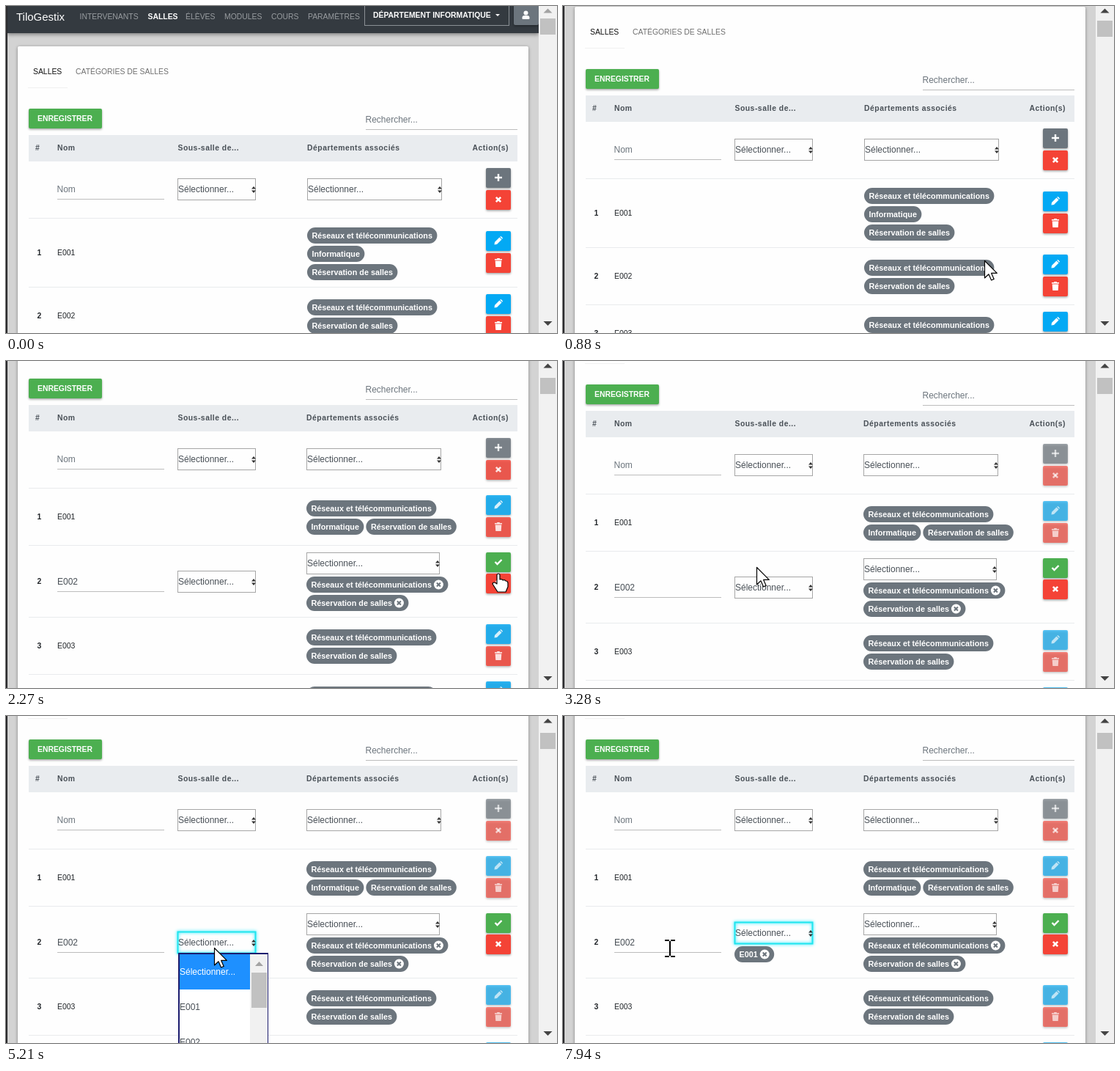
Animation of 752x446 px, one loop 8000 ms. Source, as an HTML page with a canvas:

```html
<!DOCTYPE html>
<html lang="fr">
<head>
<meta charset="utf-8">
<style>
  html, body { margin: 0; width: 100%; height: 100%; overflow: hidden; background: #d3d3d3; }
  canvas { display: block; }
</style>
</head>
<body>
<canvas id="stage" width="752" height="446"></canvas>
<script>
const ctx = document.getElementById('stage').getContext('2d');
const LOOP = 8000;
const FONT = '"Liberation Sans", Arial, sans-serif';
const GRAY = '#6c757d', GREEN = '#4caf50', RED = '#f44336', BLUE = '#03a9f4';
const NET = 'Réseaux et télécommunications', INFO = 'Informatique', BOOKING = 'Réservation de salles';
const rooms = [
  ['E001', [NET, INFO, BOOKING]],
  ['E002', [NET, BOOKING]],
  ['E003', [NET, BOOKING]],
  ['E004', [NET, INFO, BOOKING]],
];

// [time, value]: values hold until the next time
const scrollSteps = [[0, 0], [770, 14], [880, 54], [950, 88], [1020, 110], [1090, 116],
  [2570, 113], [2650, 110], [2730, 108]];
const fadeSteps = [[0, 1], [2270, .82], [2400, .65]];

// [first step, last step, step count, x, y]
const pointerMoves = [
  [300, 300, 1, 586, 377], [380, 380, 1, 575, 347], [1320, 1870, 8, 672, 290],
  [3110, 3280, 3, 264, 281], [3360, 3510, 3, 244, 311], [3590, 3740, 3, 267, 294],
  [4350, 4430, 2, 285, 303], [4590, 4590, 1, 285, 312], [5210, 5210, 1, 284, 316],
  [5290, 5680, 6, 264, 379], [6380, 6760, 6, 541, 266], [6930, 7010, 2, 550, 266],
  [7310, 7550, 4, 247, 291], [7860, 7940, 2, 146, 317],
];

const held = (steps, t) => steps.filter(s => s[0] <= t).pop()[1];

function pointerAt(t) {
  let x = 586, y = 377;
  for (const [from, to, count, toX, toY] of pointerMoves) {
    if (t < from) break;
    const gap = (to - from) / Math.max(1, count - 1);
    const done = gap ? Math.min(count, Math.floor((t - from) / gap + .01) + 1) / count : 1;
    x += (toX - x) * done;
    y += (toY - y) * done;
  }
  return { x: Math.round(x), y: Math.round(y) };
}

function rect(x, y, w, h, color) {
  ctx.fillStyle = color;
  ctx.fillRect(x, y, w, h);
}

function pill(x, y, w, h, r, color) {
  ctx.fillStyle = color;
  ctx.beginPath();
  ctx.roundRect(x, y, w, h, r);
  ctx.fill();
}

function shadow(color, blur, dy) {
  ctx.shadowColor = color;
  ctx.shadowBlur = blur;
  ctx.shadowOffsetY = dy;
}

function raised(x, y, w, h, color) {
  ctx.save();
  shadow('rgba(0,0,0,.35)', 3, 1.5);
  pill(x, y, w, h, 2, color);
  ctx.restore();
}

function text(str, x, y, size, color, weight = '', spacing = 0) {
  ctx.font = `${weight} ${size}px ${FONT}`;
  ctx.letterSpacing = spacing + 'px';
  ctx.fillStyle = color;
  ctx.fillText(str, x, y);
}

function shape(points, color) {
  ctx.fillStyle = color;
  ctx.beginPath();
  points.forEach(([x, y]) => ctx.lineTo(x, y));
  ctx.closePath();
  ctx.fill();
}

function line(points, width, color) {
  ctx.strokeStyle = color;
  ctx.lineWidth = width;
  ctx.beginPath();
  points.forEach(([x, y], i) => i ? ctx.lineTo(x, y) : ctx.moveTo(x, y));
  ctx.stroke();
}

function cross(r, width, color) {
  line([[-r, -r], [r, r]], width, color);
  line([[-r, r], [r, -r]], width, color);
}

function disc(x, y, r, color) {
  ctx.fillStyle = color;
  ctx.beginPath();
  ctx.arc(x, y, r, 0, 7);
  ctx.fill();
}

function at(x, y, draw) {
  ctx.save();
  ctx.translate(x, y);
  draw();
  ctx.restore();
}

const icons = {
  plus() {
    rect(-5, -1.2, 10, 2.4, '#fff');
    rect(-1.2, -5, 2.4, 10, '#fff');
  },
  cross() { cross(3.2, 2.6, '#fff'); },
  check() { line([[-4.5, 0], [-1.5, 3], [4.5, -3]], 2.4, '#fff'); },
  pencil() {
    shape([[-5.5, 5.5], [-5, 2], [1.5, -4.5], [4.5, -1.5], [-2, 5]], '#fff');
    shape([[2.2, -5.2], [3.6, -6], [6, -3.6], [5.2, -2.2]], '#fff');
  },
  trash() {
    rect(-5, -5, 10, 1.6, '#fff');
    rect(-1.8, -6, 3.6, 1.5, '#fff');
    shape([[-4.3, -2.6], [4.3, -2.6], [3.7, 6], [-3.7, 6]], '#fff');
  },
};

function iconButton(y, color, icon, alpha = 1) {
  ctx.globalAlpha = alpha;
  raised(655, y, 34, 27, color);
  at(672, y + 13, icons[icon]);
  ctx.globalAlpha = 1;
}

function badge(label, x, y, closable) {
  ctx.font = `bold 10.8px ${FONT}`;
  ctx.letterSpacing = '0px';
  const w = ctx.measureText(label).width + (closable ? 29 : 13);
  pill(x, y, w, 22, 11, GRAY);
  text(label, x + 6.5, y + 15, 10.8, '#fff', 'bold');
  if (closable) at(x + w - 13, y + 11, () => {
    disc(0, 0, 6.5, '#fff');
    cross(2.5, 2, GRAY);
  });
  return w;
}

function select(x, y, w, focused) {
  ctx.save();
  if (focused) shadow('#00e5ff', 4, 0);
  ctx.lineWidth = focused ? 2 : 1;
  ctx.strokeStyle = focused ? '#1fe5ee' : '#a6a6a6';
  ctx.strokeRect(x + .5, y + .5, w - 1, 29);
  ctx.restore();
  text('Sélectionner...', x + 1, y + 19, 12, '#495057');
  at(x + w - 3, y + 15.5, () => {
    shape([[-3, -1], [0, -4.5], [3, -1]], '#333');
    shape([[-3, 1], [0, 4.5], [3, 1]], '#333');
  });
}

function navbar() {
  ctx.save();
  shadow('rgba(0,0,0,.4)', 5, 2);
  rect(2, 0, 725, 37, '#343a40');
  ctx.restore();
  text('TiloGestix', 14, 20, 15, '#fff');
  const items = [['INTERVENANTS', 100.5], ['ÉLÈVES', 245], ['MODULES', 298], ['COURS', 362], ['PARAMÈTRES', 412]];
  items.forEach(([label, x]) => text(label, x, 18, 10.4, '#999da0'));
  text('SALLES', 193.5, 18, 10.4, '#fff', 'bold');
  ctx.lineWidth = 1;
  ctx.strokeStyle = '#8b9095';
  ctx.strokeRect(489.5, -2.5, 197, 29);
  text('DÉPARTEMENT INFORMATIQUE', 501, 16, 10.4, '#fff', 'bold');
  shape([[668, 11], [674, 11], [671, 14]], '#fff');
  raised(693, -2, 34, 28, GRAY);
  disc(709.5, 9.5, 3, '#fff');
  pill(704.5, 13, 10, 5, [3, 3, 1, 1], '#fff');
}

function toolbarAndHead(deptX) {
  text('SALLES', 37, 93, 10.4, '#111');
  text('CATÉGORIES DE SALLES', 95, 93, 10.4, '#707070');
  rect(30, 111, 54, 1, '#f0f0f0');
  raised(31, 140, 100, 27, GREEN);
  text('ENREGISTRER', 43, 157, 10.4, '#fff', 'bold');
  text('Rechercher...', 490.5, 159, 12, GRAY);
  rect(491, 168, 207, 1, '#bdbdbd');
  rect(31, 176, 667, 36, '#e9ecef');
  const heads = [['#', 40], ['Nom', 70], ['Sous-salle de...', 234.5], ['Départements associés', deptX], ['Action(s)', 636.5]];
  heads.forEach(([label, x]) => text(label, x, 197, 10.4, '#495057', 'bold', .5));
}

function filterRow(deptX, fade) {
  text('Nom', 69.5, 254, 12, GRAY);
  rect(70, 263, 146, 1, '#bdbdbd');
  select(234, 235, 107);
  select(deptX, 235, 184);
  iconButton(221, GRAY, 'plus', fade);
  iconButton(251, RED, 'cross', fade);
}

function editedRow(name, badges, mid, state) {
  text(name, 70, mid + 4, 12, '#495057');
  rect(70, mid + 13, 146, 1, '#bdbdbd');
  select(234, mid - (state.chosen ? 28 : 15), 107, state.focused);
  if (state.chosen) badge('E001', 234, mid + 5, true);
  select(410, mid - 40, 182);
  badges.forEach((label, i) => badge(label, 410, mid - 7 + 25 * i, true));
  iconButton(mid - 40, GREEN, 'check');
  iconButton(mid - 11, RED, 'cross');
}

function roomRows(deptX, state) {
  let top = 290;
  rooms.forEach(([name, badges], i) => {
    const edited = state.editing && i === 1;
    // the wider column lets the two short badges share a line
    const lines = state.editing && badges.length === 3
      ? [[badges[0]], badges.slice(1)] : badges.map(label => [label]);
    const tall = lines.length === 3;
    const height = edited ? 98 : tall ? 94 : 78;
    const mid = top + height / 2;
    rect(31, top - 1, 667, 1, '#e9ebed');
    text(i + 1, 42.5, mid + 3, 10.4, '#212529', 'bold');
    if (edited) editedRow(name, badges, mid, state);
    else {
      text(name, 70, mid + 3, 10.4, '#212529');
      lines.forEach((labels, row) => {
        let x = deptX;
        for (const label of labels) x += badge(label, x, top + (tall ? 12 : 16) + 25 * row) + 3;
      });
      iconButton(mid - 30, BLUE, 'pencil', state.fade);
      iconButton(mid, RED, 'trash', state.fade);
    }
    top += height;
  });
}

function scrollbar(scroll) {
  rect(727, 0, 25, 446, '#f1f1f1');
  rect(729, Math.round(17 + scroll * .054), 21, 22, '#c1c1c1');
  shape([[733.5, 9.5], [739.5, 3.5], [745.5, 9.5]], scroll ? '#444' : '#a3a3a3');
  shape([[733.5, 430], [739.5, 436], [745.5, 430]], '#444');
}

function dropdown(hovered) {
  rect(235, 323, 123, 123, '#1c1c6e');
  rect(237, 325, 96, 121, '#fff');
  rect(333, 325, 24, 121, '#f1f1f1');
  rect(335, 350, 21, 48, '#c1c1c1');
  shape([[340, 341], [345.5, 335], [351, 341]], '#a3a3a3');
  ['Sélectionner...', 'E001', 'E002'].forEach((label, i) => {
    if (i === hovered) rect(237, 325 + 48 * i, 96, 48, '#1e90ff');
    text(label, 237, 353 + 48 * i, 12, i === hovered ? '#fff' : '#495057');
  });
}

function outlined(path) {
  ctx.fillStyle = '#fff';
  ctx.strokeStyle = '#000';
  ctx.lineWidth = 1.2;
  ctx.lineJoin = 'round';
  ctx.fill(path);
  ctx.stroke(path);
}

const arrow = new Path2D('M.5 .5V24L6 18.8L9.6 27L13.2 25.4L9.7 17.4H17.3Z');
const hand = new Path2D('M-2 1.5Q0-1.5 2 1.5V8Q5 7 6 9Q9 8 10 10Q13 10 13 13V18L10 25H-1L-8 14Q-7 10-2 14Z');

function pointer({ x, y }) {
  at(x, y, () => {
    if (x > 655) outlined(hand);
    else if (x > 216) outlined(arrow);
    else {
      rect(-1, -10, 2, 20, '#000');
      for (const edge of [-12, 10]) {
        rect(-7, edge, 6, 2, '#000');
        rect(1, edge, 6, 2, '#000');
      }
    }
  });
}

function draw(t) {
  const scroll = held(scrollSteps, t);
  const state = {
    editing: t >= 2270,
    fade: held(fadeSteps, t),
    focused: t >= 4590,
    chosen: t >= 6000,
  };
  const deptX = state.editing ? 410 : 411;
  const mouse = pointerAt(t);

  rect(0, 0, 752, 446, '#d3d3d3');
  at(0, -scroll, () => {
    navbar();
    ctx.save();
    shadow('rgba(0,0,0,.4)', 4, 1);
    pill(16, 55, 697, 900, 2, '#fefefe');
    ctx.restore();
    toolbarAndHead(deptX);
    filterRow(deptX, state.fade);
    roomRows(deptX, state);
  });
  rect(0, 0, 2, 446, '#2a2a2c');
  scrollbar(scroll);
  if (state.focused && !state.chosen) dropdown(mouse.y >= 373 ? 1 : 0);
  if (t >= 300) pointer(mouse);
}

function tick() {
  draw(performance.now() % LOOP);
  requestAnimationFrame(tick);
}
tick();
</script>
</body>
</html>
```
